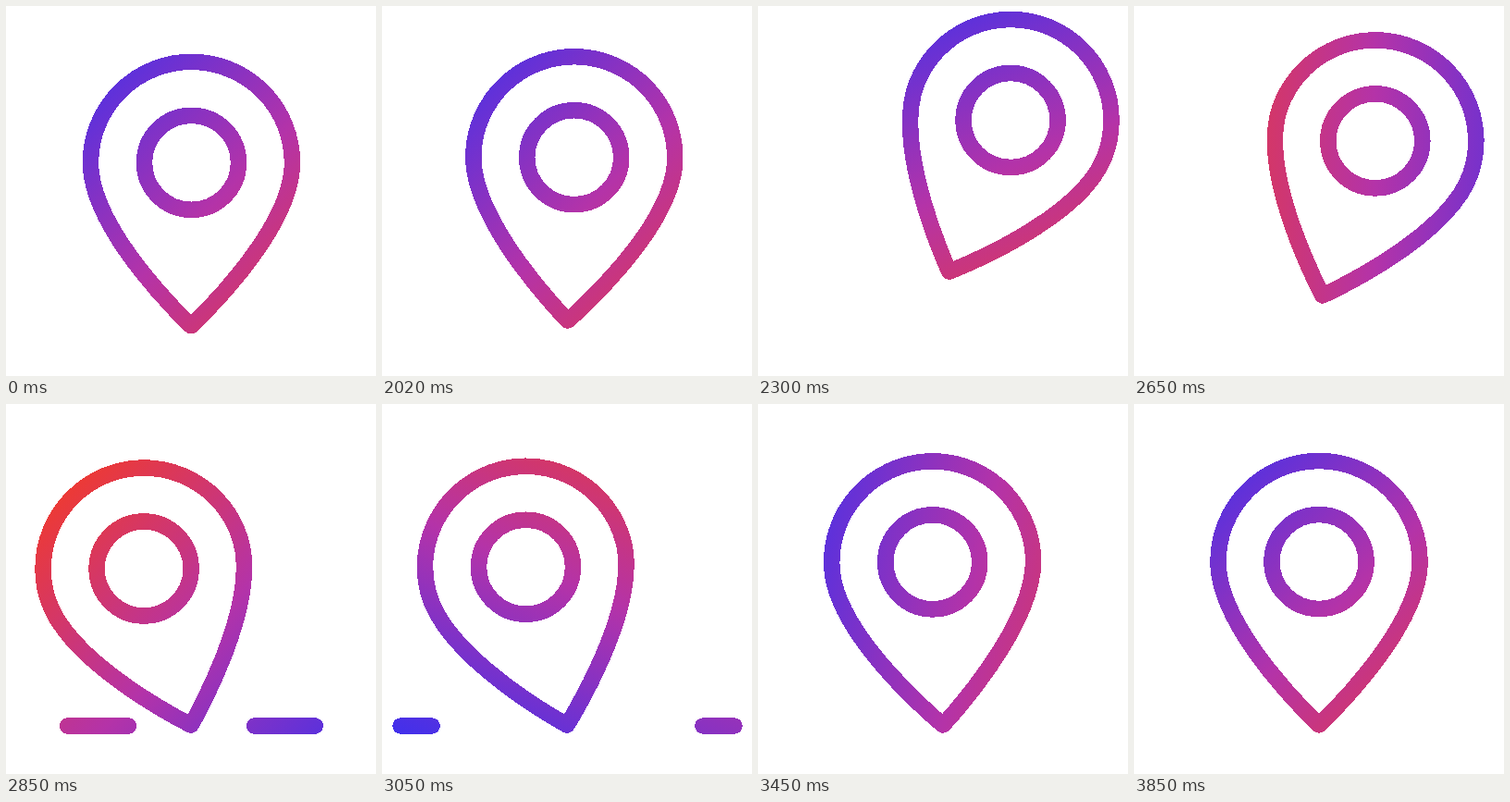
These frames come from a looping animation (400x400 px, 3870 ms). An HTML page:

```html
<!DOCTYPE html>
<html lang="en">
<head>
<meta charset="utf-8">
<title>Bouncing location pin</title>
<style>
  html, body { margin: 0; width: 100%; height: 100%; overflow: hidden; background: #fff; }
  svg { display: block; width: 100%; height: 100%; }
</style>
</head>
<body>
<svg viewBox="0 0 400 400" shape-rendering="crispEdges">
  <defs>
    <linearGradient id="sweep" gradientUnits="userSpaceOnUse">
      <stop offset="0" stop-color="#4030ec"/>
      <stop offset=".5" stop-color="#b433a8"/>
      <stop offset="1" stop-color="#f03a2e"/>
    </linearGradient>
  </defs>
  <path id="icon" fill="none" stroke="url(#sweep)" stroke-width="17.5"
        stroke-linecap="round" stroke-linejoin="round"/>
</svg>
<script>
const LOOP = 3870, REST_END = 2020;
const HEAD_R = 109, HOLE_R = 51, HEAD_Y = -176.5;
const GRADIENT_HALF = 225;

const icon = document.getElementById('icon');
const sweep = document.getElementById('sweep');

const easeIn = s => s * s;
const easeOut = s => 1 - (1 - s) ** 2;
const easeInOut = s => s * s * (3 - 2 * s);
const progress = (t, from, to) => Math.min(1, Math.max(0, (t - from) / (to - from)));

// Swing of the pin around its tip: [time, degrees, easing towards it]
const swing = [
  [2000, 0], [2450, 24.8, easeOut], [2569, 24.8, easeInOut], [2949, -25, easeInOut],
  [3250, 14, easeInOut], [3490, -5, easeInOut], [3850, 0, easeInOut]
];
// Gradient: [time, direction of the blue end in degrees], [time, shift along it]
const turn = [[2000, -135], [2300, -114], [2650, 0], [2850, 45], [3170, 146], [3850, 225]];
const shift = [[2000, -28], [2300, -6], [2650, 60], [2850, 41], [3170, -24], [3850, -28]];

function tween(keys, t) {
  let value = keys[0][1];
  for (let i = 1; i < keys.length; i++) {
    const [from, start] = keys[i - 1], [to, goal, ease] = keys[i];
    if (t >= from) value = start + (goal - start) * ease(progress(t, from, to));
  }
  return value;
}

// Smooth curve through the keys, at rest at both ends
function spline(keys, t) {
  const last = keys.length - 1;
  const slope = i => i === 0 || i === last ? 0
    : (keys[i + 1][1] - keys[i - 1][1]) / (keys[i + 1][0] - keys[i - 1][0]);
  let i = 0;
  while (i < last - 1 && t >= keys[i + 1][0]) i++;
  const [t0, a] = keys[i], [t1, b] = keys[i + 1];
  const s = progress(t, t0, t1), span = t1 - t0;
  return a + (b - a) * easeInOut(s)
    + span * (slope(i) * s * (1 - s) ** 2 - slope(i + 1) * s * s * (1 - s));
}

function pinPath(t) {
  const lift = easeOut(progress(t, 1997, 2447)) - easeIn(progress(t, 2480, 2724));
  const angle = tween(swing, t) * Math.PI / 180;
  const cos = Math.cos(angle), sin = Math.sin(angle);
  const tipX = 200 + 7.5 * lift, tipY = 347 - 67 * lift;
  const at = (x, y) => [tipX + x * cos - y * sin, tipY + x * sin + y * cos];
  const tip = at(0, 0), [cx, cy] = at(0, HEAD_Y);
  const half = `${HOLE_R} ${HOLE_R} 0 0 1`;
  return `M${tip}C${tip} ${at(-HEAD_R, -101)} ${at(-HEAD_R, HEAD_Y)}`
    + `A${HEAD_R} ${HEAD_R} 0 0 1 ${at(HEAD_R, HEAD_Y)}`
    + `C${at(HEAD_R, -101)} ${tip} ${tip}Z`
    + `M${cx - HOLE_R} ${cy}A${half} ${cx + HOLE_R} ${cy}A${half} ${cx - HOLE_R} ${cy}Z`;
}

// Two dashes shoot outwards when the pin lands
function dashPath(t) {
  if (t < 2710 || t > 3205) return '';
  const lead = 60 + 128 * easeOut(progress(t, 2680, 3170));
  const trail = 60 + 128 * easeInOut(progress(t, 2785, 3215));
  return [-1, 1].map(side => `M${200.5 + side * trail} 348H${200.5 + side * lead}`).join('');
}

function draw(time) {
  const t = time < REST_END ? 2001 : time;
  icon.setAttribute('d', pinPath(t) + dashPath(t));
  const angle = spline(turn, t) * Math.PI / 180, mid = spline(shift, t);
  const set = (n, d) => {
    sweep.setAttribute('x' + n, 200 + d * Math.cos(angle));
    sweep.setAttribute('y' + n, 200 + d * Math.sin(angle));
  };
  set(1, mid + GRADIENT_HALF);
  set(2, mid - GRADIENT_HALF);
}

const start = performance.now();
function frame() {
  draw((performance.now() - start) % LOOP);
  requestAnimationFrame(frame);
}
frame();
</script>
</body>
</html>
```
